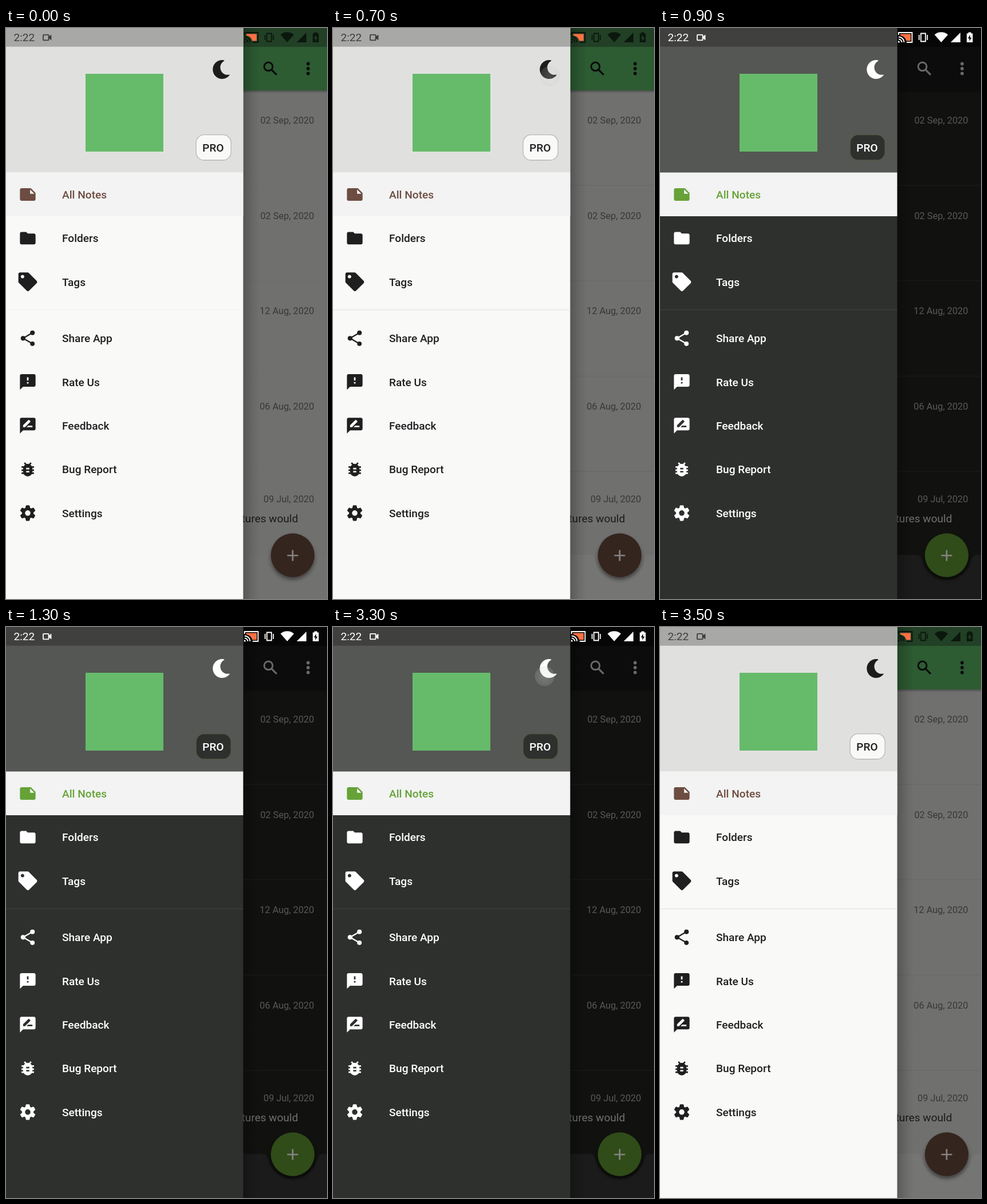
An HTML page that plays this animation: 561 by 998 pixels, repeating every 3.6 s.

```html
<!DOCTYPE html>
<html lang="en">
<head>
<meta charset="utf-8">
<title>Notes drawer theme switch</title>
<style>
  html, body { margin: 0; width: 100%; height: 100%; overflow: hidden; }
  svg { display: block; width: 100%; height: 100%; font-family: Roboto, sans-serif; }
  .menu { font-size: 19.09px; font-weight: 500; }
  .date { font-size: 16.36px; text-anchor: end; fill: var(--date); }
  .ink { fill: var(--ink); opacity: var(--inkAlpha); }
  .ink .line, .sys .line { fill: none; stroke: var(--ink); }
  .sys { fill: var(--sys); }
  .sys .line { stroke: var(--sys); }
  .rule { stroke: var(--rule); }
  .sep { stroke: var(--sep); }
</style>
</head>
<body>
<svg id="stage" viewBox="0 0 561 998" preserveAspectRatio="none">
  <defs>
    <linearGradient id="edge">
      <stop offset="0" stop-color="#000" stop-opacity=".24"/>
      <stop offset=".55" stop-color="#000" stop-opacity=".08"/>
      <stop offset="1" stop-color="#000" stop-opacity="0"/>
    </linearGradient>
    <linearGradient id="drop" x2="0" y2="1">
      <stop offset="0" stop-color="#000" stop-opacity=".3"/>
      <stop offset="1" stop-color="#000" stop-opacity="0"/>
    </linearGradient>
    <radialGradient id="finger">
      <stop offset="0" stop-color="#e4e4e4" stop-opacity=".75"/>
      <stop offset=".7" stop-color="#cfcfcf" stop-opacity=".6"/>
      <stop offset="1" stop-color="#c4c4c4" stop-opacity=".42"/>
    </radialGradient>
    <filter id="blur" x="-30%" y="-30%" width="160%" height="160%"><feGaussianBlur stdDeviation="3.5"/></filter>
  </defs>

  <!-- page under the scrim -->
  <rect width="561" height="998" style="fill:var(--page)"/>
  <g id="seps" class="sep" stroke-width="1.4"></g>
  <g id="dates"></g>
  <text x="510.5" y="864" font-size="19.09" text-anchor="end" style="fill:var(--body)">tures would</text>
  <path id="bar" style="fill:var(--bar)" d="M410 921H448q8 0 10 9A44 44 0 0 0 544 930q2-9 10-9H561V998H410z"/>
  <circle cx="501" cy="926" r="38" opacity=".45" filter="url(#blur)"/>
  <circle cx="501" cy="921.5" r="38.2" style="fill:var(--fab)"/>
  <path d="M491.5 922h19M501 912.5v19" stroke="#858483" stroke-width="2.7"/>
  <rect y="109" x="414" width="147" height="5" fill="url(#drop)"/>
  <rect width="561" height="109" style="fill:var(--app)"/>
  <rect x="414" width="147" height="33" style="fill:var(--status)"/>
  <g style="fill:var(--tool);stroke:var(--tool)">
    <circle cx="458.6" cy="67.4" r="7.4" fill="none" stroke-width="2.9"/>
    <path d="M464 72.8l9 9" stroke-width="3.2"/>
    <g stroke="none">
      <circle cx="528" cy="62.5" r="2.9"/><circle cx="528" cy="71" r="2.9"/><circle cx="528" cy="79.5" r="2.9"/>
    </g>
  </g>
  <rect x="414" width="30" height="998" fill="url(#edge)"/>

  <!-- drawer -->
  <rect width="414.5" height="998" style="fill:var(--drawer)"/>
  <rect width="414.5" height="252.5" style="fill:var(--head)"/>
  <rect width="414.5" height="32.7" fill="#000" opacity=".25"/>
  <rect y="252.5" width="414.5" height="76.5" fill="#f2f3f2"/>
  <path id="rule" class="rule" d="M0 492.5H414.5" stroke-width="1.4"/>
  <rect x="139" y="80" width="136" height="136" fill="#66bb6a"/>
  <rect x="332.2" y="186.6" width="61" height="44.4" rx="14" stroke-width="1.3" style="fill:var(--drawer);stroke:var(--rim)"/>
  <g class="ink">
    <path transform="translate(359.6 56) scale(.0643)" d="M283 512c79 0 151-36 199-95 7-9-1-21-12-19-124 24-238-72-238-197 0-72 39-139 102-175 9-5 7-20-4-22A258 258 0 0 0 283 0C142 0 27 115 27 256c0 141 115 256 256 256z"/>
    <text class="menu" x="362" y="216" text-anchor="middle">PRO</text>
    <g id="menu"></g>
  </g>
  <g id="active" class="menu" style="fill:var(--accent)"></g>

  <!-- status icons -->
  <g class="sys">
    <text x="13.5" y="23" font-size="19.09">2:22</text>
    <rect class="line" x="65" y="11.8" width="9.6" height="9.6" rx="1" stroke-width="1.8"/>
    <path d="M75 15l4.4-3.6v10.2L75 18z"/>
    <path class="line" d="M417 12V8h23.5v17H431M417 15.5a9.5 9.5 0 0 1 9.5 9.5M417 19.5a5.5 5.5 0 0 1 5.5 5.5" stroke-width="1.9"/>
    <path d="M416 22.5a3 3 0 0 1 3 3h-3z"/>
    <path d="M420 10.5h18v12h-7.6a13 13 0 0 0-10.4-9.6z" fill="#ff7043"/>
    <path class="line" d="M456 9.5h8v14h-8zM452.8 12v9M467.2 12v9" stroke-width="1.8"/>
    <path d="M491.5 25L479.8 11.8a17.5 17.5 0 0 1 23.4 0z"/>
    <path d="M508 25h17V8z"/>
    <path fill-rule="evenodd" d="M538.8 7.5h5v2h2.7v15.5h-10.4V9.500h2.700zM542 12l-4 6.300h2.600v4.700l4-6.300H542z"/>
  </g>

  <g id="touch">
    <circle r="17" fill="url(#finger)"/>
    <circle r="16.4" fill="none" stroke="#b4b4b4" stroke-opacity=".55" stroke-width="1.2"/>
  </g>
</svg>
<script>
const LOOP = 3600, STEP = 100;
const el = id => document.getElementById(id);
const clamp = v => Math.min(1, Math.max(0, v));

// [light, dark]
const colors = {
  page: ["#70716f", "#11120f"], sep: ["#6a6b69", "#191a18"], bar: ["#757674", "#1a1b1a"],
  app: ["#2d5b32", "#0b0c0b"], status: ["#214025", "#050605"], tool: ["#080a08", "#686968"],
  date: ["#373837", "#585957"], body: ["#1a1b1a", "#70716f"], fab: ["#35251f", "#304c19"],
  drawer: ["#f9faf8", "#2e302e"], head: ["#e0e1df", "#555754"], rule: ["#e6e8e6", "#3c3e3c"],
  rim: ["#bcb5b1", "#535b45"], ink: ["#000000", "#ffffff"], accent: ["#6d4c41", "#66a238"]
};

const bubble = "M20 2H4c-1.1 0-2 .9-2 2V22l4-4h14c1.1 0 2-.9 2-2V4c0-1.100-.9-2-2-2z";
const tooth = a => `<path transform="translate(12 12) rotate(${a})" d="M-3.300-5.500L-2.400-9.400Q-2.300-10-1.800-10H1.800Q2.300-10 2.400-9.400L3.300-5.500z"/>`;
const solid = d => `<path fill-rule="evenodd" d="${d}"/>`;
const icons = {
  note: solid("M22 10l-6-6H4c-1.1 0-2 .9-2 2v12c0 1.1.9 2 2 2h16c1.100 0 2-.9 2-2zM15 5.500l5.500 5.500H15z"),
  folder: solid("M10 4H4c-1.100 0-2 .9-2 2v12c0 1.100.9 2 2 2h16c1.100 0 2-.9 2-2V8c0-1.100-.9-2-2-2h-8z"),
  tag: solid("M0 11.800V2.300Q0 0 2.300 0h9.500q1 0 1.600.7l9.900 9.900q1.500 1.600 0 3.200l-9.500 9.500q-1.600 1.500-3.200 0L.7 13.400Q0 12.800 0 11.800zM5.300 3a2.250 2.250 0 1 0 .01 0z"),
  share: `<path class="line" d="M18 5L6 12l12 7" stroke-width="1.700"/><circle cx="18" cy="5" r="3"/><circle cx="6" cy="12" r="3"/><circle cx="18" cy="19" r="2.900"/>`,
  rate: solid(bubble + "M11 12h2v2h-2zM11 6h2v4h-2z"),
  review: solid(bubble + "M6 14v-2.500l6.900-6.900q.35-.3.700 0l1.800 1.800q.3.350 0 .7L8.500 14zM18 14h-7.500l2-2H18z"),
  bug: solid("M6 11a6 6 0 0 1 12 0v4a6 6 0 0 1-12 0zM10 10h4v2h-4zM10 14h4v2h-4z") +
    `<path class="line" d="M4 9h3M17 9h3M4 13h2.200M17.800 13h2.200M4 17h3M17 17h3M7.700 3.700l2.600 2.600M16.300 3.700l-2.600 2.600" stroke-width="2"/>`,
  gear: `<circle class="line" cx="12" cy="12" r="5.400" stroke-width="3.800"/>` + [0, 60, 120, 180, 240, 300].map(tooth).join("")
};

const row = (label, icon, y) =>
  `<g transform="translate(${38 - 16.36} ${y - 16.36}) scale(1.3637)">${icons[icon]}</g>` +
  `<text class="menu" x="98" y="${y + 6.8}">${label}</text>`;

el("active").innerHTML = row("All Notes", "note", 291);
el("menu").innerHTML = [
  ["Folders", "folder", 367.4], ["Tags", "tag", 443.7], ["Share App", "share", 542.3],
  ["Rate Us", "rate", 618.7], ["Feedback", "review", 695], ["Bug Report", "bug", 771.4],
  ["Settings", "gear", 847.8]
].map(r => row(...r)).join("");

el("dates").innerHTML = [
  ["02 Sep, 2020", 167], ["02 Sep, 2020", 333.5], ["12 Aug, 2020", 500.3],
  ["06 Aug, 2020", 666.8], ["09 Jul, 2020", 829]
].map(([s, y]) => `<text class="date" x="538.5" y="${y}">${s}</text>`).join("");
el("seps").innerHTML = [275, 441.5, 608.5, 775].map(y => `<path d="M414 ${y}H561"/>`).join("");

// taps: start, x, y, opacity per step
const taps = [
  { at: 500, x: 379, y: 84, fade: [.55, .8, .3] },
  { at: 3100, x: 370, y: 86, fade: [1, .9, .35] }
];

const rgb = hex => [1, 3, 5].map(i => parseInt(hex.slice(i, i + 2), 16));
const mix = (a, b, k) => a + (b - a) * k;
const pairs = Object.entries(colors).map(([name, c]) => [name, ...c.map(rgb)]);
const style = el("stage").style;

function draw(ms) {
  const t = Math.floor((ms % LOOP) / STEP) * STEP;
  const dark = clamp((t - 700) / 200) - clamp((t - 3300) / 200);
  for (const [name, a, b] of pairs)
    style.setProperty("--" + name, `rgb(${a.map((v, i) => Math.round(mix(v, b[i], dark)))})`);
  style.setProperty("--inkAlpha", mix(.88, 1, dark));
  style.setProperty("--sys", t >= 900 && t < 3500 ? "#fff" : "rgba(0,0,0,.64)");

  const crisp = t < 500 ? .2 : 1;
  for (const id of ["seps", "rule", "bar"]) el(id).style.opacity = crisp;

  const tap = taps.find(p => t >= p.at && t < p.at + p.fade.length * STEP);
  const touch = el("touch");
  touch.style.opacity = tap ? tap.fade[(t - tap.at) / STEP] : 0;
  if (tap) touch.setAttribute("transform", `translate(${tap.x} ${tap.y})`);
}

const start = performance.now();
function tick() {
  draw(performance.now() - start);
  requestAnimationFrame(tick);
}
tick();
</script>
</body>
</html>
```
